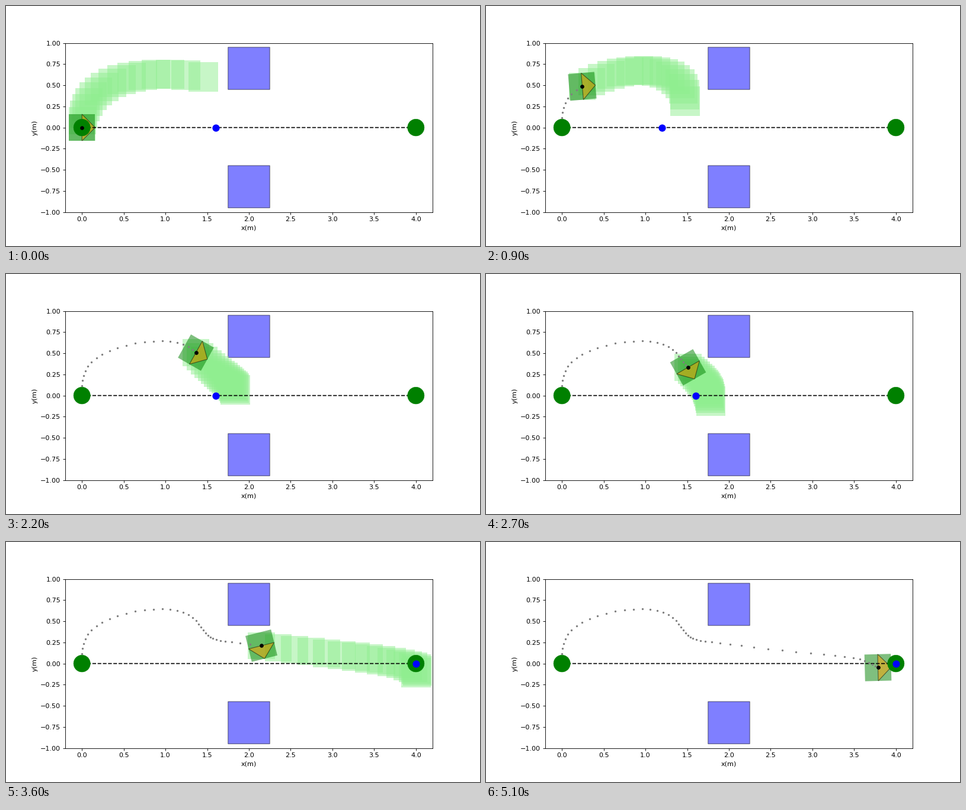
A matplotlib script for the animation above (5200 ms loop, 800 by 406 pixels).

```python
import numpy as np
import matplotlib.pyplot as plt
from matplotlib.animation import FuncAnimation
from matplotlib.patches import Ellipse, Polygon, Rectangle

W, H, DPI = 800, 406, 80
FRAMES, INTERVAL = 52, 100
HORIZON = 15          # predicted steps per plan
LEAD = 7              # steps a plan keeps the current heading
SWITCH = 29           # step at which the final goal takes over
HALF = 0.158          # half side of the robot

# Robot path in stage pixels, one key point every 3 steps
PATH = np.array([
    (128.2, 205.2), (129, 180), (138, 156), (162.5, 135.5), (203, 120.3),
    (249.5, 113.2), (289.5, 115.8), (314.7, 127.5), (329.5, 143.5),
    (341, 157.5), (355, 165), (381, 169), (431, 175), (499.5, 183),
    (569.5, 189.5), (619.5, 195.3), (646.3, 203.5), (661.5, 212)])

# Where plans bend and end: step, bend x, bend y, end x, end y
TO_GAP = np.array([
    (0, 180, 100, 333, 119.5), (9, 342, 100, 336, 161),
    (18, 440, 140, 456, 188), (22, 380, 180, 387, 196), (28, 375, 195, 378, 218)])
TO_GOAL = np.array([
    (29, 700, 225, 674, 245), (31, 710, 195, 667, 207), (36, 715, 205, 692, 221),
    (44, 670, 222, 700, 221), (50, 695, 221, 697, 221)])

TURNS = [(0, 0), (9, 5), (22, -29.5), (31, -85), (36, -76), (44, -32), (51, 1.5)]


def to_data(px):
    return (np.asarray(px) - (128.2, 205.2)) / (140.9, -143)


def spline(pts, t):
    """Cubic Hermite curve through evenly spaced points."""
    slope = np.gradient(pts, axis=0)
    i = np.clip(t.astype(int), 0, len(pts) - 2)
    u = (t - i)[:, None]
    return ((1 + 2 * u) * (1 - u) ** 2 * pts[i] + u * (1 - u) ** 2 * slope[i]
            + u * u * (3 - 2 * u) * pts[i + 1] + u * u * (u - 1) * slope[i + 1])


TRACK = spline(PATH, np.arange(FRAMES) / 3)
SPEED = np.gradient(TRACK, axis=0)
TRACK_XY = to_data(TRACK)


def plan(n):
    """Bezier curve that leaves along the current motion."""
    keys = TO_GAP if n < SWITCH else TO_GOAL
    bx, by, ex, ey = (np.interp(n, keys[:, 0], col) for col in keys[:, 1:].T)
    start, bend, end = TRACK[n], np.array([bx, by]), np.array([ex, ey])
    lead = LEAD * SPEED[n]
    lead *= min(1, 0.6 * np.linalg.norm(end - start) / np.linalg.norm(lead))
    s = np.linspace(0, 1, HORIZON + 1)[:, None]
    curve = ((1 - s) ** 3 * start + 3 * s * (1 - s) ** 2 * (start + lead)
             + 3 * s * s * (1 - s) * bend + s ** 3 * end)
    return to_data(curve)


def subgoal(n):
    if n >= SWITCH:
        return 4.0
    return 1.2 if 3 <= n < 15 else 1.6


fig = plt.figure(figsize=(W / DPI, H / DPI), dpi=DPI, facecolor="white")
ax = fig.add_axes([100 / W, 57.4 / H, 620 / W, 286 / H])
ax.set(xlim=(-0.2, 4.2), ylim=(-1, 1), xlabel="x(m)", ylabel="y(m)")
ax.set_xticks(np.arange(0, 4.1, 0.5))
ax.set_yticks(np.arange(-1, 1.1, 0.25))

for y in (-0.95, 0.45):
    ax.add_patch(Rectangle((1.75, y), 0.5, 0.5, fc="blue", ec="black",
                           alpha=0.5, snap=False))
ax.plot([0, 4], [0, 0], "k--", lw=1.5, snap=False)
for x in (0, 4):
    ax.add_patch(Ellipse((x, 0), 0.2, 0.2, color="green", lw=0.5, zorder=3))

boxes = []
for side in np.linspace(0.32, 0.35, HORIZON + 1):
    box = Rectangle((0, 0), side, side, fc="lightgreen", ec="none", alpha=0.5)
    boxes.append(ax.add_patch(box))
body = ax.add_patch(Polygon(np.zeros((4, 2)), fc="green", ec="none", alpha=0.5))
nose = ax.add_patch(Polygon(np.zeros((3, 2)), fc="orange", ec="black", alpha=0.5))
trail, = ax.plot([], [], "o", color="gray", ms=2, snap=False)
goal, = ax.plot([], [], "o", color="blue", ms=10, zorder=4, snap=False)
center, = ax.plot([], [], "o", color="black", ms=5, zorder=5, snap=False)

SQUARE = HALF * np.array([(-1, -1), (1, -1), (1, 1), (-1, 1)])
ARROW = HALF * np.array([(0, -1), (1, 0), (0, 1)])


def draw(n):
    pos = TRACK_XY[n]
    a = np.radians(np.interp(n, *zip(*TURNS)))
    turn = np.array([(np.cos(a), np.sin(a)), (-np.sin(a), np.cos(a))])
    body.set_xy(SQUARE @ turn + pos)
    nose.set_xy(ARROW @ turn + pos)

    for box, (x, y) in zip(boxes, plan(n)):
        half = box.get_width() / 2
        box.set_xy((x - half, y - half))
        box.set_visible(n < FRAMES - 1)

    trail.set_data(*TRACK_XY[:n].T)
    goal.set_data([subgoal(n)], [0])
    center.set_data([pos[0]], [pos[1]])
    return [*boxes, body, nose, trail, goal, center]


anim = FuncAnimation(fig, draw, frames=FRAMES, interval=INTERVAL,
                     repeat=True, repeat_delay=0, blit=False)
plt.show()
```
